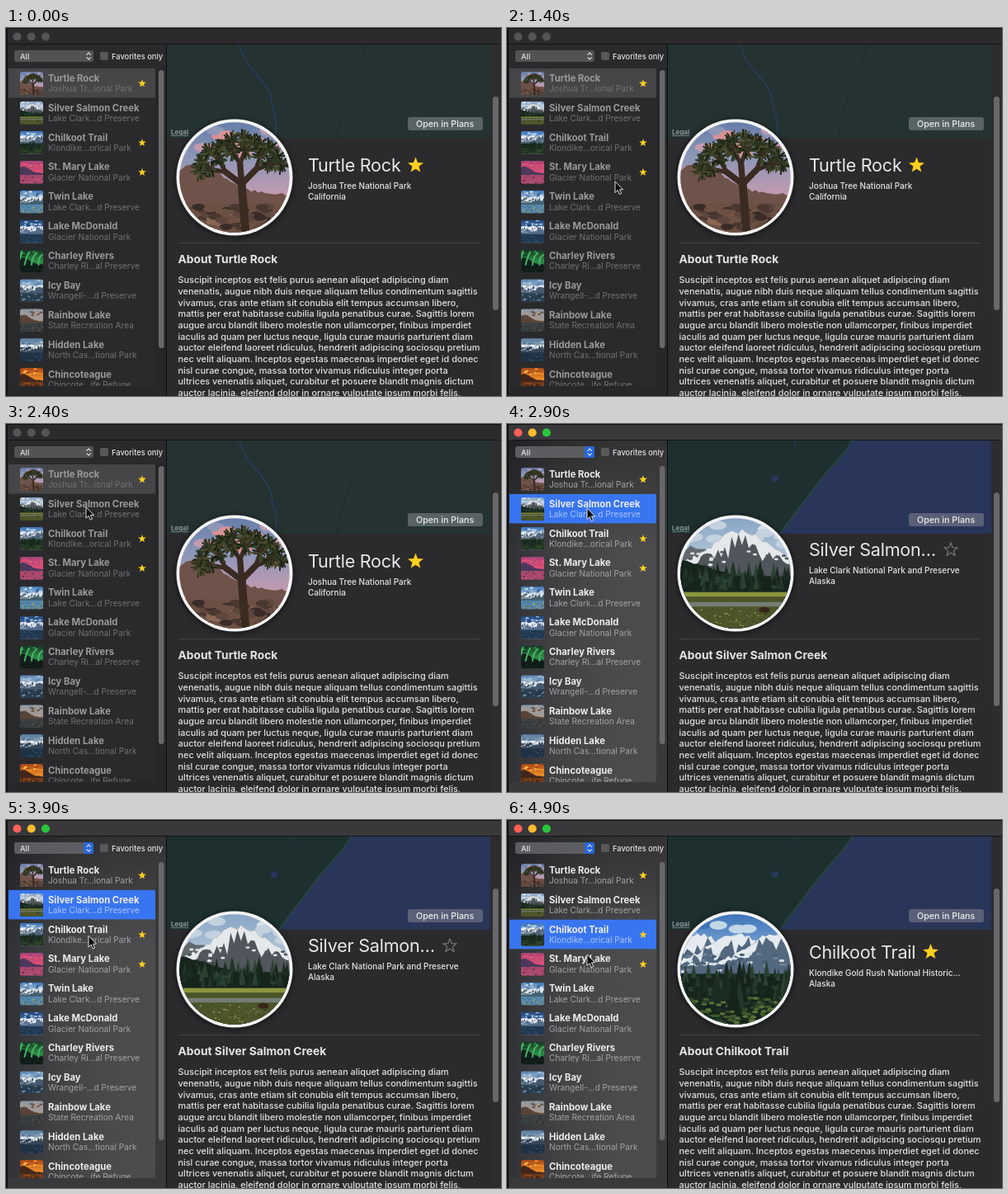
Recreate the animation shown at these times as an HTML page. Size 600 by 446 pixels, loop 5000 ms.

```html
<!DOCTYPE html>
<html lang="en">
<head>
<meta charset="utf-8">
<title>Landmarks</title>
<style>
html, body { margin: 0; width: 100%; height: 100%; overflow: hidden; background: #111; }
svg { display: block; }
text { font-family: Inter, "Open Sans", sans-serif; white-space: pre; }
.name { font-size: 11.25px; font-weight: 700; }
.sub { font-size: 10.15px; }
.place { font-size: 10px; font-weight: 500; fill: #e4e4e5; }
.small { font-size: 9.3px; font-weight: 500; fill: #e2e2e3; }
.title { font-size: 21.6px; letter-spacing: -.25px; fill: #e8e8e9; }
.head { font-size: 13.8px; font-weight: 700; fill: #e4e4e5; }
.body { font-size: 10.87px; font-weight: 500; fill: #e0e0e1; }
.legal { font-size: 8px; font-weight: 700; fill: #87969a; text-decoration: underline; }
.button { font-size: 10.7px; font-weight: 500; fill: #eceded; }
</style>
</head>
<body>
<svg id="stage" width="600" height="446" viewBox="0 0 600 446"></svg>
<script>
let seed = 7;
const rnd = (a, b) => {
  seed = (seed * 16807) % 2147483647;
  return a + (b - a) * seed / 2147483647;
};
const pick = list => list[Math.floor(rnd(0, list.length))];
const times = (n, fn) => Array.from({ length: n }, (_, i) => fn(i)).join('');
const rect = (x, y, w, h, fill, r = 0) =>
  `<rect x="${x}" y="${y}" width="${w}" height="${h}" rx="${r}" fill="${fill}"/>`;
const disc = (x, y, r, fill) => `<circle cx="${x}" cy="${y}" r="${r}" fill="${fill}"/>`;
const path = (d, fill) => `<path d="${d}" fill="${fill}"/>`;
const line = (d, color, w) =>
  `<path d="${d}" fill="none" stroke="${color}" stroke-width="${w}" stroke-linecap="round"/>`;
const text = (cls, x, y, str, fill) =>
  `<text class="${cls}" x="${x}" y="${y}"${fill ? ` fill="${fill}"` : ''}>${str}</text>`;
const grad = (id, stops, x2 = 0) => `<linearGradient id="${id}" x2="${x2}" y2="${1 - x2}">${stops.map((c, i) =>
  `<stop offset="${i / (stops.length - 1)}" stop-color="${c}"/>`).join('')}</linearGradient>`;

function star(x, y, r, attrs) {
  const pts = Array.from({ length: 10 }, (_, i) => {
    const a = i * Math.PI / 5, d = i % 2 ? r * .42 : r;
    return (x + d * Math.sin(a)).toFixed(1) + ',' + (y - d * Math.cos(a)).toFixed(1);
  });
  return `<polygon points="${pts.join(' ')}" stroke-linejoin="round" ${attrs}/>`;
}
const gold = 'fill="#ffd01f"';

// Pictures live in a 100 x 100 box
const flecks = (n, y0, y1, size, colors) => times(n, () =>
  `<ellipse cx="${rnd(0, 100).toFixed(1)}" cy="${rnd(y0, y1).toFixed(1)}" rx="${size}" ry="${size * .5}" fill="${pick(colors)}"/>`);
const pines = (n, y0, y1, h, colors) => times(n, () => {
  const k = h * rnd(.7, 1.2);
  return path(`M${rnd(0, 100).toFixed(1)} ${(rnd(y0, y1) - k).toFixed(1)}l${(k * .2).toFixed(1)} ${k.toFixed(1)}h${(-k * .4).toFixed(1)}Z`, pick(colors));
});

// A rough bell-shaped ridge; snow hangs from its top by random depths
function mountain(base, height, peak, rock, snow) {
  const top = Array.from({ length: 34 }, (_, i) => {
    const x = i * 3.1;
    return [x, base - height * Math.exp(-(((x - peak) / 36) ** 2)) - rnd(0, height * .14)];
  });
  const edge = top.map(([x, y]) => [x, y + rnd(0, .75) * (base - y)]).reverse();
  const d = pts => pts.map(p => p.map(v => v.toFixed(1)).join(' ')).join('L');
  return path(`M0 100L${d(top)}V100Z`, rock) + (snow ? path(`M${d(top)}L${d(edge)}Z`, snow) : '');
}

function scene(i, air, hill, floor, y = 62) {
  return grad('air' + i, air) + rect(0, 0, 100, 100, `url(#air${i})`) +
    flecks(14, 4, 30, 8, air) +
    times(hill.length > 1 ? 3 : 1, k => mountain(y - 6, 28, 15 + k * 36, ...hill)) +
    rect(0, y, 100, 100 - y, floor[0]) + flecks(40, y + 3, 98, 4, floor);
}

const tuft = (x, y) => times(38, () => {
  const a = rnd(0, 2 * Math.PI), d = rnd(3, 9);
  return line(`M${x.toFixed(1)} ${y.toFixed(1)}l${(d * Math.cos(a)).toFixed(1)} ${(d * Math.sin(a)).toFixed(1)}`,
    pick(['#27301c', '#1b2115', '#343b22', '#4b4a2e']), 1.4);
});
function branch(x, y, angle, len, depth) {
  const x2 = x + len * Math.sin(angle), y2 = y - len * Math.cos(angle);
  const n = depth === 3 ? 3 : 2;
  return line(`M${x} ${y}L${x2} ${y2}`, '#3a2b22', 2 + depth * 1.8) + (depth < 2 ? tuft(x2, y2) : '') +
    (depth ? times(n, i => branch(x2, y2, angle + (i - (n - 1) / 2) * .85, depth === 3 ? 18 : len * .75, depth - 1)) : '');
}

const rocks = ['#6d5044', '#4a3830', '#8a6654', '#392c28', '#5d463c'];
const woods = ['#16251c', '#22372a', '#2b4232', '#1b2d22'];
const aurora = ['#163524', '#2d8a47', '#1c5432'];
const photos = [
  scene(0, ['#667ea9', '#8e97b8', '#c49aae', '#d99296'], ['#6f5249'], rocks, 74) +
    flecks(60, 74, 98, 6, rocks) + branch(60, 100, -.08, 44, 3),

  scene(1, ['#87a5c5', '#c3d2df', '#d9e1e8'], ['#62686c'], woods) +
    mountain(46, 32, 55, '#50565b', '#e4e8eb') + flecks(26, 30, 44, 2, ['#50565b', '#dde2e6']) +
    mountain(54, 14, 0, woods[0]) + pines(80, 52, 67, 13, woods) +
    rect(0, 67, 100, 33, '#4c5429') + rect(0, 67, 100, 4, '#8d953f') + rect(0, 76, 100, 4, '#747d75') +
    flecks(130, 82, 99, 1, ['#7d8142', '#343f20', '#a69a62', '#5d6731']) +
    `<ellipse cx="76" cy="83" rx="5" ry="2.6" fill="#38261b"/>`,

  scene(2, ['#3f74b8', '#7ba5d5', '#c3d6e6', '#c3d6e6'], ['#53687f', '#e4eaef'], woods, 54) +
    flecks(40, 36, 52, 2.4, ['#465a70', '#6d8297', '#d3dee6']) +
    pines(70, 56, 80, 13, woods) + flecks(150, 76, 99, 2.6, ['#3f5a2b', '#1c2f1c', '#59723a', '#30492a']) +
    pines(8, 74, 90, 32, woods),

  scene(3, ['#a4447c', '#e04f73', '#dc6878'], ['#4c385c'], ['#a8486a', '#38304e', '#cf587a']),
  scene(4, ['#386fae', '#d5e2ec', '#6d9dbd'], ['#45606e', '#dbe4ea'], ['#5387ac', '#b0a060', '#3d5c52']),
  scene(5, ['#24497f', '#4d7cb4', '#a4bed4'], ['#526b8a', '#e8edf1'], ['#213850', '#304f6c']),
  scene(6, aurora, ['#12201c'], ['#101b18', '#1b3025'], 72) +
    times(4, i => line(`M${i * 30 - 10} 66Q${i * 24 + 4} 30 ${i * 32 + 8} ${8 + i * 4}`, '#48b562', 7)),
  scene(7, ['#5d88b6', '#a6bfd4', '#8aa2b8'], ['#455a70', '#e6ecf0'], ['#2a3e50', '#a8b8c2', '#1c2c3a']),
  scene(8, ['#8b98a8', '#a69a90', '#6b5444'], ['#584438'], ['#3a4042', '#7e4c38', '#252b27']),
  scene(9, ['#55779c', '#b4c4d0', '#62839a'], ['#35465a', '#e6ebee'], ['#1f3148', '#3c5a74', '#24362f']),
  scene(10, ['#a9481a', '#ef9028', '#f9ba45'], ['#43261a'], ['#8f481e', '#2d1c16']) +
    pines(16, 80, 100, 26, ['#2d1c16', '#53301c'])
];

const rows = [
  ['Turtle Rock', 'Joshua Tr…ional Park', 1],
  ['Silver Salmon Creek', 'Lake Clark…d Preserve'],
  ['Chilkoot Trail', 'Klondike…orical Park', 1],
  ['St. Mary Lake', 'Glacier National Park', 1],
  ['Twin Lake', 'Lake Clark…d Preserve'],
  ['Lake McDonald', 'Glacier National Park'],
  ['Charley Rivers', 'Charley Ri…al Preserve'],
  ['Icy Bay', 'Wrangell-…d Preserve'],
  ['Rainbow Lake', 'State Recreation Area'],
  ['Hidden Lake', 'North Cas…tional Park'],
  ['Chincoteague', 'Chincote…ife Refuge']
];
const details = [
  { title: 'Turtle Rock', park: 'Joshua Tree National Park', state: 'California', y: 174, starX: 496.5 },
  { title: 'Silver Salmon…', park: 'Lake Clark National Park and Preserve', state: 'Alaska', y: 160, starX: 538 },
  { title: 'Chilkoot Trail', park: 'Klondike Gold Rush National Historic…', state: 'Alaska', y: 167.5, starX: 513.5 }
];
const story = [
  'Suscipit inceptos est felis purus aenean aliquet adipiscing diam',
  'venenatis, augue nibh duis neque aliquam tellus condimentum sagittis',
  'vivamus, cras ante etiam sit conubia elit tempus accumsan libero,',
  'mattis per erat habitasse cubilia ligula penatibus curae. Sagittis lorem',
  'augue arcu blandit libero molestie non ullamcorper, finibus imperdiet',
  'iaculis ad quam per luctus neque, ligula curae mauris parturient diam',
  'auctor eleifend laoreet ridiculus, hendrerit adipiscing sociosqu pretium',
  'nec velit aliquam. Inceptos egestas maecenas imperdiet eget id donec',
  'nisl curae congue, massa tortor vivamus ridiculus integer porta',
  'ultrices venenatis aliquet, curabitur et posuere blandit magnis dictum',
  'auctor lacinia, eleifend dolor in ornare vulputate ipsum morbi felis,'
];

const pitch = 35.9;

function sidebar(sel, active) {
  const list = rows.map(([name, sub, fav], i) => {
    const on = i === sel;
    return `<g transform="translate(0 ${(i * pitch).toFixed(1)})">` +
      (on ? rect(3, 49, 178, 35.5, active ? '#3875f0' : '#464648') : '') +
      `<g clip-path="url(#tile)"><use href="#photo${i}" x="17" y="53" width="28" height="28"/></g>` +
      text('name', 51, 64.8, name, active ? '#ececed' : '#9a9a9c') +
      text('sub', 51, 77, sub, on && active ? '#a9c4f8' : active ? '#a3a3a6' : '#717174') +
      (fav ? star(165, 67.3, 5, gold) : '') + '</g>';
  }).join('');
  const strip = active ? '#39393b' : '#272729';
  return rect(2, 20, 192, 426, active ? 'url(#glass)' : '#2a2a2c') +
    (active ? rect(2, 20, 192, 130, 'url(#shade)') : '') +
    rect(181, 48, 13, 398, strip) + `<g clip-path="url(#list)">${list}</g>` +
    rect(3, 434, 178, 12, strip) + rect(185, 51, 6.5, 337, '#68686a', 3.2) +
    rect(10, 27, 96, 14, active ? '#5c5d60' : '#535355', 3) +
    (active ? rect(94, 27, 12, 14, '#2868dc', 3) : '') +
    line('M98 32.3l2.2-2.2 2.2 2.2M98 35.8l2.2 2.2 2.2-2.2', '#e4e4e6', 1.1) +
    text('small', 17, 37.6, 'All') + rect(114, 29, 10, 10, '#58585a', 2) +
    text('small', 128, 37.6, 'Favorites only') + rect(194, 20, 1, 426, '#0d0d0e');
}

function terrain(sel) {
  if (!sel) return rect(195, 20, 392, 113, '#243331') +
    line('M283 20C290 52 318 62 322 88S330 112 326 133', '#293f72', 1.1) +
    line('M437 20C430 52 408 82 401 133', '#1e2b29', 1);
  const coast = 'M418 20C408 40 390 53 375 74S345 112 331 133';
  return rect(195, 20, 392, 113, '#1d302f') + path(coast + 'H587V20Z', '#293559') +
    line(coast, '#28493b', 1.5) + disc(325, 66, 4, '#28365e') + line('M349 20q1 4-1 8', '#28365e', 1);
}

function view(sel, active) {
  const d = details[sel], faded = '#555557';
  return '<g class="view" visibility="hidden">' +
    rect(2, 1, 598, 19, active ? '#39393b' : '#2b2b2d') + rect(2, 19, 598, 1, '#151516') +
    ['#fb5f57', '#fdbc2f', '#29c73f'].map((c, i) => disc(13.5 + i * 17.2, 10.5, 5.1, active ? c : faded)).join('') +
    sidebar(sel, active) + rect(195, 20, 405, 426, '#2b2a2d') + terrain(sel) +
    text('legal', 200, 129.3, 'Legal') +
    rect(487, 108, 91, 16, sel ? '#5a6078' : '#596363', 3) + text('button', 497, 119.8, 'Open in Plans') +
    rect(587, 20, 13, 426, '#2d2d2f') + rect(590, 83, 7, 259, '#68686a', 3.5) +
    '<circle cx="277" cy="182" r="72" opacity=".45" filter="url(#blur)"/>' + disc(277, 181, 70.5, '#f4f4f4') +
    `<g clip-path="url(#round)"><use href="#photo${sel}" x="210" y="114" width="134" height="134"/></g>` +
    text('title', 366, d.y, d.title) +
    star(d.starX, d.y - 7.5, rows[sel][2] ? 10 : 8.6, rows[sel][2] ? gold : 'fill="none" stroke="#77777a" stroke-width="1.2"') +
    text('place', 366, d.y + 21, d.park) + text('place', 366, d.y + 34.4, d.state) +
    rect(209, 260, 365, 1, '#444446') + text('head', 208.5, 284.6, 'About ' + rows[sel][0]) +
    story.map((s, i) => text('body', 208.5, 309.4 + i * 13.65, s)).join('') + '</g>';
}

const stage = document.getElementById('stage');
stage.innerHTML = `<defs>
  ${grad('glass', ['#313236', '#434345', '#4b4b4d', '#4c4c4e'], 1)}
  ${grad('shade', ['#0005', '#0000'])}
  <filter id="blur"><feGaussianBlur stdDeviation="3"/></filter>
  <clipPath id="list"><rect x="2" y="48" width="179" height="386"/></clipPath>
  <clipPath id="tile"><rect x="17" y="53" width="28" height="28" rx="3"/></clipPath>
  <clipPath id="round"><circle cx="277" cy="181" r="66.7"/></clipPath>
  ${photos.map((p, i) => `<symbol id="photo${i}" viewBox="0 0 100 100">${p}</symbol>`).join('')}
  </defs>` + rect(0, 0, 600, 446, '#111112') + view(0, false) + view(1, true) + view(2, true) +
  '<path id="cursor" d="M0 0V13.5L3.2 10.6 5.3 15.6 7.6 14.6 5.5 9.8H9.6Z" fill="#080808" stroke="#f2f2f2" stroke-width=".9"/>';

// Pointer stops: time, x, y
const stops = [
  [1200, 238, 292], [1400, 131, 186], [1800, 97, 98], [2700, 97, 102], [3600, 97, 102],
  [4100, 102, 166], [4300, 102, 166], [4600, 98, 140], [4900, 97, 163]
];
const clicks = [2700, 4600];
const views = [...stage.querySelectorAll('.view')];
const cursor = document.getElementById('cursor');

function draw(now) {
  const t = Math.floor(now % 5000 / 100) * 100;
  const sel = clicks.filter(c => c <= t).length;
  views.forEach((v, i) => v.setAttribute('visibility', i === sel ? 'visible' : 'hidden'));
  const from = stops.filter(s => s[0] <= t).pop();
  cursor.style.display = from ? '' : 'none';
  if (from) {
    const to = stops.find(s => s[0] > t) || from;
    const f = (t - from[0]) / (to[0] - from[0] || 1);
    const [x, y] = [1, 2].map(k => from[k] + (to[k] - from[k]) * f);
    cursor.setAttribute('transform', `translate(${x} ${y})`);
  }
  requestAnimationFrame(draw);
}
draw(performance.now());
</script>
</body>
</html>
```
